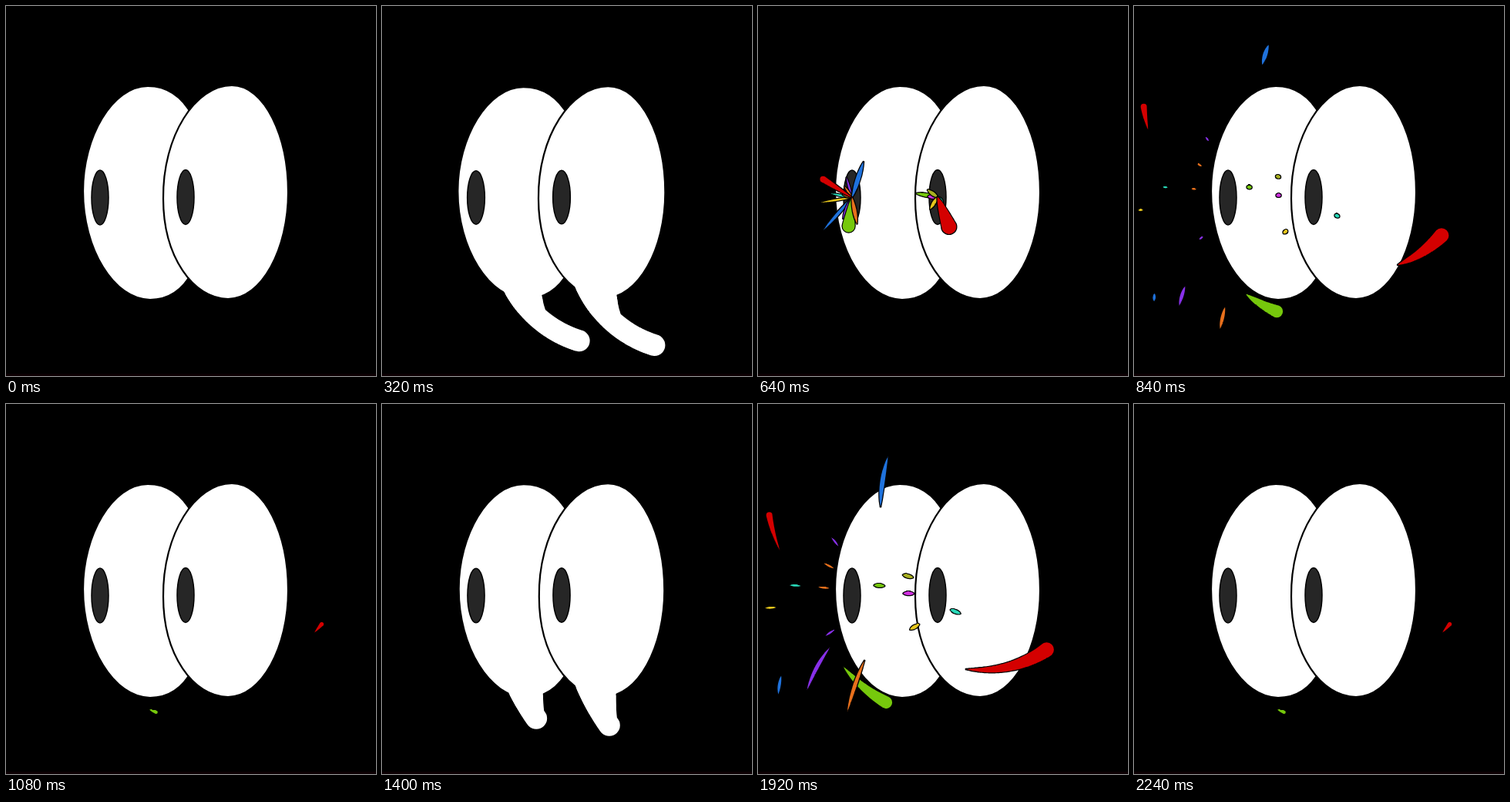
These frames come from a looping animation (480x480 px, 2.32 s). An HTML page with a canvas:

```html
<!DOCTYPE html>
<html lang="en">
<head>
<meta charset="utf-8">
<title>Popping eyes</title>
<style>
html, body { margin: 0; width: 100%; height: 100%; overflow: hidden; background: #000; }
canvas { display: block; width: 100vw; height: 100vh; }
</style>
</head>
<body>
<canvas id="stage" width="480" height="480"></canvas>
<script>
const ctx = document.getElementById('stage').getContext('2d');
const CYCLE = 1160, GROW = 120, PEAK = 480, BURST = 640;
const RED = '#d40000', GREEN = '#76c80c', BLUE = '#1f72dc', PURPLE = '#8830e8';
const ORANGE = '#e8701c', YELLOW = '#e6c61c', TEAL = '#28d8b8', PINK = '#d030e0';

const eyes = [
  { pivot: 216, px: 122, py: 248.5, tongueY: 249.5, stripes: ['#8a30c4', YELLOW, BLUE],
    shape: new Path2D('M184 104C234 104 262 160 262 242C262 330 234 381 187 381C140 381 100 315 100 240C100 170 138 104 184 104Z') },
  { pivot: 273, px: 233, py: 248, tongueY: 257, stripes: [BLUE, PURPLE, RED],
    shape: new Path2D('M293 103C336 103 366 170 366 242C366 315 332 380 288 380C243 380 204 325 204 250C203 168 246 103 293 103Z') }
];

const lerp = (a, b, k) => a + (b - a) * k;
const clamp = k => Math.max(0, Math.min(1, k));

// Large drops: flight start and end, sideways bend, width.
const bigDrops = [
  { color: BLUE, eye: 0, from: [159, 133], to: [178, 42], bend: -.1, width: 6 },
  { color: BLUE, eye: 0, from: [30, 353], to: [26, 386], bend: .06, width: 4 },
  { color: RED, eye: 0, from: [28, 189], to: [12, 124], bend: -.08, width: 8, fat: true },
  { color: PURPLE, eye: 0, from: [93, 316], to: [57, 397], bend: .12, width: 5 },
  { color: GREEN, eye: 0, from: [111, 341], to: [195, 400], bend: .14, width: 16, fat: true },
  { color: ORANGE, eye: 0, from: [138, 333], to: [110, 428], bend: .06, width: 5 },
  { color: RED, eye: 1, from: [270, 344], to: [410, 285], bend: .27, width: 19, fat: true }
];

// Small drops only need a start; they drift away from their pupil, mostly sideways.
function smallDrop(color, eye, x, y) {
  const dx = x - eyes[eye].px, dy = (y - eyes[eye].py) * .35;
  const reach = 19 / Math.hypot(dx, dy);
  return { color, eye, from: [x, y], to: [x + dx * reach, y + dy * reach], bend: 0, width: 4.5 - 2 * (eye === 0) };
}

const drops = [
  smallDrop(YELLOW, 0, 23, 264), smallDrop(TEAL, 0, 55, 236), smallDrop(ORANGE, 0, 92, 239),
  smallDrop(PURPLE, 0, 104, 184), smallDrop(ORANGE, 0, 98, 213), smallDrop(PURPLE, 0, 99, 293),
  smallDrop(GREEN, 1, 164, 236), smallDrop(PINK, 1, 202, 246), smallDrop('#a8b020', 1, 201, 225),
  smallDrop(YELLOW, 1, 209, 286), smallDrop(TEAL, 1, 250, 267),
  ...bigDrops
];

// The drawing is held on steps of 40 or 80 ms.
const growSteps = [0, GROW, 200, 240, 320, 400, PEAK, 520, 600];
function hold(t) {
  if (t < BURST) return growSteps.filter(s => s <= t).pop();
  const step = t < 1000 ? 40 : 80;
  return 1000 + Math.floor((t - 1000) / step) * step;
}

function dots(list, grow, color) {
  ctx.fillStyle = color;
  ctx.beginPath();
  for (const { x, y, r } of list) {
    ctx.moveTo(x + r + grow, y);
    ctx.arc(x, y, r + grow, 0, 7);
  }
  ctx.fill();
}

// An arc that lengthens and curls as it grows, flared inwards at its base.
function tailDots(grow, length, eye) {
  const turn = 3.96 * grow ** 2.4;
  const list = [];
  let x = eye ? 258 : 168 - 14 * grow;
  let y = eye ? 345 : 331 + 15 * grow;
  for (let d = 0; d <= length; d++) {
    const angle = 1.2 + .11 * grow - turn * d / length;
    const flare = 18 * Math.max(0, 1 - d / 75);
    list.push({ x: x + flare * Math.sin(angle), y: y - flare * Math.cos(angle), r: 14 + flare, d });
    x += Math.cos(angle);
    y += Math.sin(angle);
  }
  return list;
}

function drawTongue(eye, length) {
  const right = eye.px + 13, left = right - length;
  const y = eye.tongueY, h = 17;
  ctx.beginPath();
  ctx.moveTo(right - 2, y - h);
  ctx.bezierCurveTo(left + 8, y - h + 3, left, y - 11, left, y + 1);
  ctx.bezierCurveTo(left, y + 12, left + 4, y + h, right - 4, y + h - 1);
  ctx.quadraticCurveTo(right + 1, y, right - 2, y - h);
  ctx.save();
  ctx.clip();
  eye.stripes.forEach((color, i) => {
    ctx.fillStyle = color;
    ctx.fillRect(left - 2, y - h + i * 12, length + 6, 24);
  });
  ctx.restore();
  ctx.lineWidth = 1.6;
  ctx.stroke();
}

// Ink folds where the curled tail meets the eye.
function drawFolds(foldX, foldY, crookX, crookY) {
  ctx.lineWidth = 2;
  ctx.beginPath();
  ctx.moveTo(foldX, foldY);
  ctx.quadraticCurveTo(foldX + 9, foldY + 7, foldX + 23, foldY + 9);
  ctx.stroke();
  ctx.translate(crookX, crookY);
  ctx.fillStyle = '#000';
  ctx.fill(new Path2D('M0 0Q8 15 29 26Q18 14 16 2Z'));
  ctx.translate(-crookX, -crookY);
}

function drawEye(eye, index, t) {
  const grow = clamp((t - GROW) / (PEAK - GROW));
  const after = Math.max(0, t - PEAK);
  const squash = t >= BURST ? 0 : grow ** 3 - after / 100;
  const pull = 1 - after / 130;
  const hasTail = t >= GROW && pull > .1;
  const spine = hasTail ? tailDots(grow, (30 + 267 * grow ** 1.5) * pull, index) : [];

  dots(spine, 1.3, '#000');
  dots(spine, 0, '#fff');
  ctx.save();
  ctx.translate(eye.pivot, 245);
  ctx.scale(1 + .086 * squash, 1 - .052 * squash);
  ctx.translate(-eye.pivot, -245);
  ctx.fillStyle = '#fff';
  ctx.lineWidth = 2.2;
  ctx.fill(eye.shape);
  ctx.stroke(eye.shape);
  ctx.restore();
  dots(spine.filter(p => p.d < 55), 0, '#fff');
  if (t === PEAK) index ? drawFolds(236, 350, 318, 365) : drawFolds(145, 368, 208, 375);

  const bulge = clamp(squash);
  ctx.beginPath();
  ctx.ellipse(eye.px, eye.py, 11 + 2 * bulge, 35.5 - 4 * bulge, 0, 0, 7);
  ctx.fillStyle = '#262626';
  ctx.fill();
  ctx.lineWidth = 1.5;
  ctx.stroke();
  if (t >= PEAK && t < BURST) drawTongue(eye, 29 + .6 * after);
}

// Before u = 0 the drop is still on its way out of the pupil.
function flightPoint({ eye, from: [x0, y0], to: [x1, y1], bend }, u) {
  if (u < 0) return [lerp(x0, eyes[eye].px, -u), lerp(y0, eyes[eye].py, -u)];
  const arc = 2 * u * (1 - u) * bend;
  return [lerp(x0, x1, u) - (y1 - y0) * arc, lerp(y0, y1, u) + (x1 - x0) * arc];
}

// Both ends ease out; the tail end starts late and catches up.
function drawDrop(drop, age) {
  const { color, width, fat } = drop;
  const head = 1 - 1.6 * Math.exp(-age / 72);
  const lag = fat ? 130 : 83;
  const tail = Math.max(-1, 1 - Math.exp((120 - age) / lag));
  const radius = width / 2 * Math.min(1, (head - tail) / .3);
  if (radius < Math.min(1.2, width / 5)) return;
  const list = [];
  for (let s = 0; s <= 1; s += 1 / 64) {
    const [x, y] = flightPoint(drop, lerp(tail, head, s));
    const taper = fat ? s ** .7 : Math.sin(Math.PI * s) ** .7;
    list.push({ x, y, r: Math.max(.3, radius * (taper || 0)) });
  }
  dots(list, 1.2, '#000');
  dots(list, 0, color);
}

function draw(time) {
  const t = hold(time % CYCLE);
  ctx.fillStyle = '#000';
  ctx.fillRect(0, 0, 480, 480);
  ctx.fillStyle = '#0c0003';
  ctx.fillRect(0, 477, 480, 3);
  ctx.strokeStyle = '#000';
  ctx.lineCap = ctx.lineJoin = 'round';
  eyes.forEach((eye, i) => drawEye(eye, i, t));
  if (t >= BURST) drops.forEach(drop => drawDrop(drop, t - BURST));
}

const start = performance.now();
function tick() {
  draw(performance.now() - start);
  requestAnimationFrame(tick);
}
tick();
</script>
</body>
</html>
```
